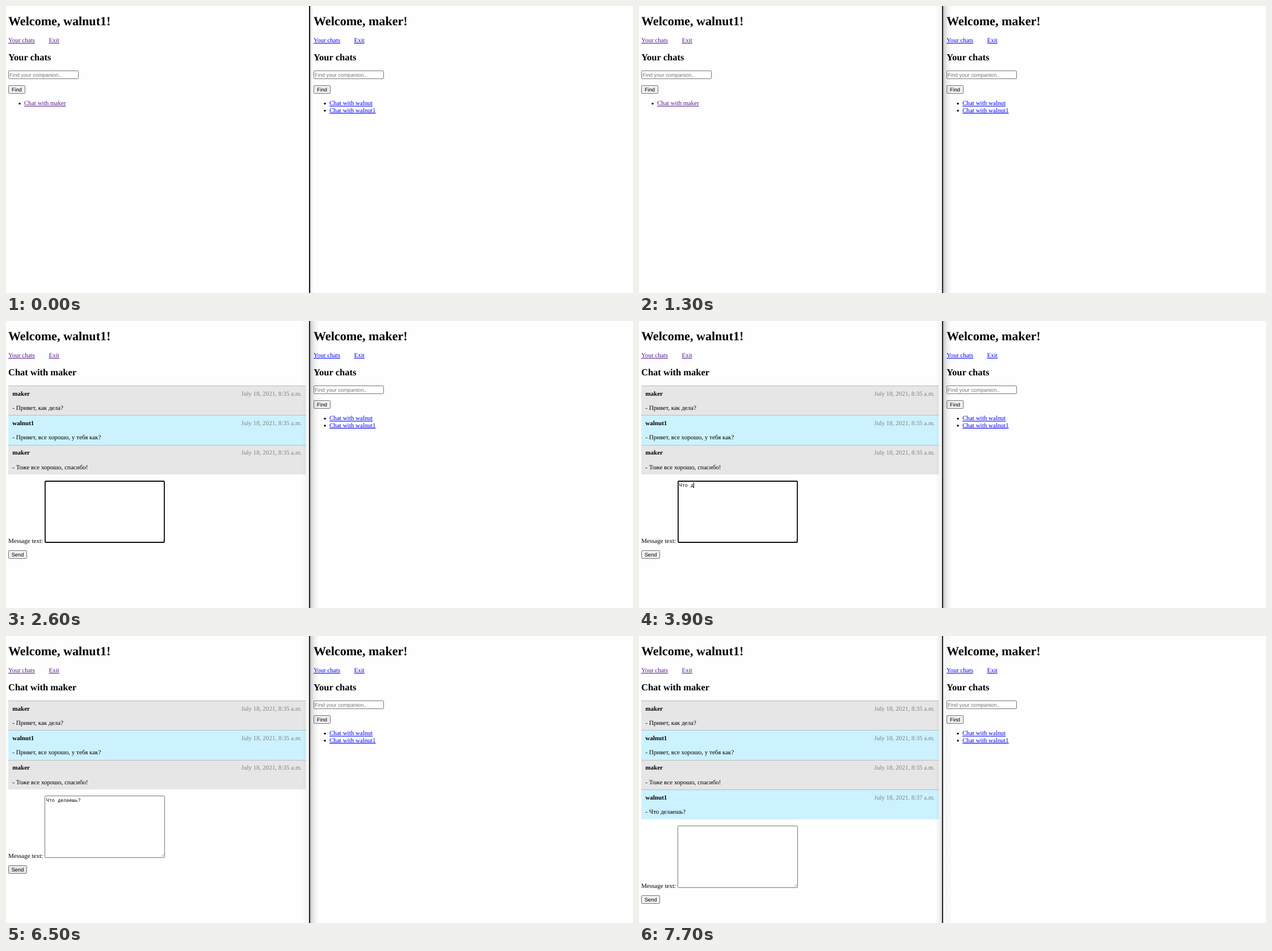
An HTML page for the animation above (8000 ms loop, 1105x507 px).

```html
<!DOCTYPE html>
<html lang="en">
<head>
<meta charset="utf-8">
<title>Two chat windows</title>
<style>
  html, body { margin: 0; width: 100%; height: 100%; overflow: hidden; background: #fefefe; }
  svg { display: block; }
  text { font: 11.05px "Liberation Serif", "Times New Roman", serif; text-rendering: geometricPrecision; white-space: pre; }
  .h1 { font-size: 22.1px; font-weight: bold; }
  .h2 { font-size: 16.5px; font-weight: bold; }
  .b { font-weight: bold; }
  .ui { font: 9.25px "Liberation Sans", Arial, sans-serif; }
  .hint { fill: #757575; }
  .mono { font: 8.46px "Noto Sans Mono", monospace; }
  .date { fill: #808080; text-anchor: end; }
  .mid { text-anchor: middle; }
  .link { fill: #0000ee; text-decoration: underline; text-decoration-thickness: 0.8px; }
  .seen { fill: #551a8b; }
  .hot { fill: #ff0000; }
</style>
</head>
<body>
<script>
const NS = 'http://www.w3.org/2000/svg';
const LOOP = 8000;
const CHAR = 5.08;
const MESSAGE = 'Что делаешь?';
const ME = 'walnut1', FRIEND = 'maker', OTHER = 'walnut';

function add(parent, tag, attrs = {}, content) {
  const el = document.createElementNS(NS, tag);
  for (const key in attrs) el.setAttribute(key, attrs[key]);
  if (content !== undefined) el.textContent = content;
  parent.appendChild(el);
  return el;
}

const svg = add(document.body, 'svg', { width: 1105, height: 507 });
const defs = add(svg, 'defs');
const group = (parent, x = 0, y = 0) => add(parent, 'g', { transform: `translate(${x} ${y})` });
const label = (parent, x, y, content, cls = '') => add(parent, 'text', { x, y, class: cls }, content);
const rect = (parent, x, y, width, height, fill) => add(parent, 'rect', { x, y, width, height, fill });
const show = (el, on) => el.setAttribute('visibility', on ? 'visible' : 'hidden');

function frame(parent, x, y, w, h, fill) {
  const el = rect(parent, x + .5, y + .5, w - 1, h - 1, fill);
  el.setAttribute('stroke', '#767676');
  el.setAttribute('rx', 1.2);
  return el;
}

function button(parent, y, w, content) {
  const el = frame(parent, 4, y, w, 15, '#efefef');
  label(parent, 4 + w / 2, y + 10.6, content, 'ui mid');
  return el;
}

function header(parent, name, cls) {
  label(parent, 4, 33.8, `Welcome, ${name}!`, 'h1');
  label(parent, 4, 64.3, 'Your chats', cls);
  label(parent, 75.4, 64.3, 'Exit', cls);
}

function chatList(parent, names, cls) {
  label(parent, 4, 96, 'Your chats', 'h2');
  frame(parent, 4, 114, 124, 15, '#fff');
  label(parent, 6, 124.7, 'Find your companion..', 'ui hint');
  button(parent, 140, 30, 'Find');
  return names.map((name, i) => {
    const y = 175.4 + 12.5 * i;
    add(parent, 'circle', { cx: 24, cy: y - 3, r: 1.7 });
    return label(parent, 32, y, `Chat with ${name}`, cls);
  });
}

function message(parent, i, name, time, content) {
  const top = Math.round(114 + 52.4 * i), end = Math.round(166.4 + 52.4 * i);
  const row = group(parent);
  rect(row, 4, top, 524.5, end - top, name === ME ? '#ccf2ff' : '#e6e6e6');
  rect(row, 4, top, 524.5, 1, '#bcbcbc');
  const y = 131.6 + 52.4 * i;
  label(row, 11.3, y, name, 'b');
  label(row, 521.4, y, `July 18, 2021, ${time} a.m.`, 'date');
  label(row, 11.3, y + 25.2, `- ${content}`);
  return row;
}

// Horizontal shadow: stops are [offset, opacity] pairs.
function shadow(id, x, width, stops) {
  const grad = add(defs, 'linearGradient', { id });
  for (const [offset, opacity] of stops)
    add(grad, 'stop', { offset, 'stop-color': '#000', 'stop-opacity': opacity });
  return rect(svg, x, 0, width, 507, `url(#${id})`);
}

rect(svg, 0, 0, 1105, 507, '#fefefe');

const left = group(svg);
header(left, ME, 'link seen');
const listPage = group(left);
const [chatLink] = chatList(listPage, [FRIEND], 'link seen');

const chatPage = group(left);
label(chatPage, 4, 96, `Chat with ${FRIEND}`, 'h2');
message(chatPage, 0, FRIEND, '8:35', 'Привет, как дела?');
message(chatPage, 1, ME, '8:35', 'Привет, все хорошо, у тебя как?');
message(chatPage, 2, FRIEND, '8:35', 'Тоже все хорошо, спасибо!');
const sentRow = message(chatPage, 3, ME, '8:37', MESSAGE);

const form = group(chatPage);
label(form, 4, 391.6, 'Message text:');
frame(form, 68, 282, 212, 110, '#fff');
add(form, 'path', { d: 'M273.5 390l5.5 -5.5M276.5 390l2.5 -2.5', stroke: '#888', 'stroke-width': .8 });
const ring = add(form, 'rect', {
  x: 69, y: 283, width: 210, height: 108, rx: 1.5, fill: 'none', stroke: '#101010', 'stroke-width': 1.8
});
const draft = label(form, 70.6, 293, '', 'mono');
const caret = rect(form, 70, 285, 1, 10, '#000');
const send = button(form, 405, 33, 'Send');

const right = group(svg, 538);
header(right, FRIEND, 'link');
chatList(right, [OTHER, ME], 'link');

const idleShade = shadow('idle', 536, 5, [[0, .16], [.5, .06], [1, 0]]);
const flatShade = shadow('flat', 524, 10, [[0, .018], [.6, .03], [1, .06]]);
const castShade = shadow('cast', 536, 14, [[0, .25], [.25, .13], [.6, .05], [1, .015]]);
const backShade = shadow('back', 524, 10, [[0, .015], [.5, .04], [1, .13]]);
const softShade = shadow('soft', 536, 14, [[0, .035], [1, .015]]);
const divider = rect(svg, 534, 0, 2, 507, '#111');

const KEYS = [2700, 2800, 3400, 3600, 3900, 4000, 4200, 4300, 4400, 4500, 4600, 5200];
const HIDDEN = [[2600, 2700], [3300, 3400], [5100, 5200], [5600, 6100]];
const within = (t, a, b) => t >= a && t < b;

function render(t) {
  const chat = t >= 1500, sent = t >= 6900;
  const focus = within(t, 2100, 6400);
  show(listPage, !chat);
  show(chatPage, chat);
  chatLink.setAttribute('class', within(t, 1200, 1300) ? 'link hot' : 'link seen');

  const typed = sent ? 0 : KEYS.filter(k => t >= k).length;
  draft.textContent = MESSAGE.slice(0, typed);
  caret.setAttribute('x', Math.round(70.4 + typed * CHAR));
  show(caret, focus && !HIDDEN.some(([a, b]) => within(t, a, b)));
  show(ring, focus);
  // An inherited state keeps the row hidden together with its page.
  sentRow.setAttribute('visibility', sent ? 'inherit' : 'hidden');
  form.setAttribute('transform', `translate(0 ${sent ? 53 : 0})`);
  send.setAttribute('fill', within(t, 6400, 6500) ? '#f5f5f5' : within(t, 6000, 6900) ? '#e5e5e5' : '#efefef');

  const active = within(t, 1200, 7700);
  show(idleShade, t < 1200);
  show(flatShade, active);
  show(castShade, active);
  show(backShade, t >= 7700);
  show(softShade, t >= 7700);
  divider.setAttribute('fill', t < 500 ? '#111' : '#222');
}

const start = performance.now();
function tick() {
  render((performance.now() - start) % LOOP);
  requestAnimationFrame(tick);
}
render(0);
requestAnimationFrame(tick);
</script>
</body>
</html>
```
